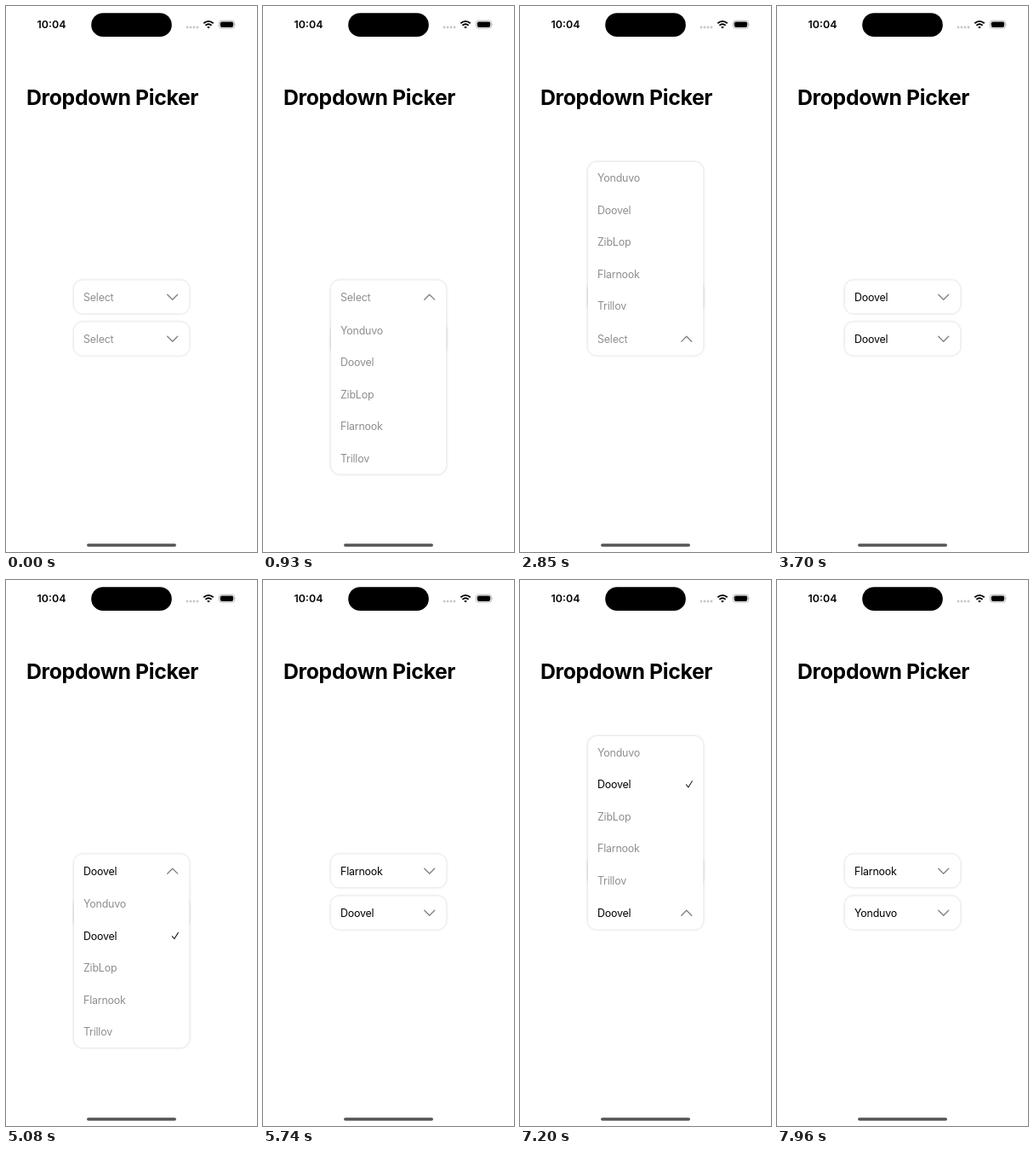
An HTML page that plays this animation: 295 by 640 pixels, repeating every 8000 ms.

```html
<!DOCTYPE html>
<html lang="en">
<head>
<meta charset="utf-8">
<title>Dropdown Picker</title>
<style>
  html, body { margin: 0; width: 100%; height: 100%; overflow: hidden; background: #fff; }
  svg { display: block; width: 295px; height: 640px; }
  text { font: 400 12.4px Inter, "Liberation Sans", sans-serif; letter-spacing: -.18px; }
  .clock { font-weight: 600; letter-spacing: 0; }
  .title { font-size: 24.8px; font-weight: 700; letter-spacing: -.34px; }
  .line { fill: none; stroke-linecap: round; stroke-linejoin: round; }
  .card { fill: #fff; filter: drop-shadow(0 0 1.7px rgba(0, 0, 0, .22)); }
</style>
</head>
<body>
<svg viewBox="0 0 295 640">
  <text class="clock" x="36.6" y="26.1">10:04</text>
  <rect x="100.2" y="8.3" width="94.6" height="27.8" rx="13.9"/>
  <g fill="#c6c6c8">
    <circle cx="213" cy="25" r="1.4"/><circle cx="217" cy="25" r="1.4"/>
    <circle cx="221" cy="25" r="1.4"/><circle cx="225" cy="25" r="1.4"/>
  </g>
  <path d="M232.3 20.3Q238 15.5 243.7 20.3M234.4 22.7Q238 19.9 241.6 22.7" fill="none" stroke="#000" stroke-width="1.8"/>
  <path d="M236.1 24.6Q238 23.2 239.9 24.6L238 26.5Z"/>
  <rect x="250.4" y="17.2" width="18.2" height="9" rx="3" fill="none" stroke="#a8a8a8" stroke-width=".8"/>
  <rect x="251.8" y="18.5" width="15.4" height="6.4" rx="1.8"/>
  <path d="M269.6 20.2q1.3 1.5 0 3z" fill="#a8a8a8"/>
  <text class="title" x="24" y="116.2">Dropdown Picker</text>
  <g id="boxes"></g>
  <rect x="95" y="630.2" width="105" height="3.6" rx="1.8" fill="#555"/>
</svg>
<script>
const LOOP = 8000, STEP = 106, LEAD = 96;
const HEAD = 38.8, ROW = 37.5, LEFT = 79.8, WIDTH = 135.6, GRAY = '#8e8e91';
const names = ['Yonduvo', 'Doovel', 'ZibLop', 'Flarnook', 'Trillov'];
const listHeight = ROW * names.length;

// time, box, chosen row (none when the tap opens the list)
const taps = [
  [500, 0], [1360, 0, 1], [2300, 1], [3380, 1, 1],
  [4530, 0], [5420, 0, 3], [6420, 1], [7430, 1, 0]
];

const root = document.getElementById('boxes');
const label = (cls, y, str = '') => `<text class="${cls}" x="91" y="${y + 4.9}" fill="${GRAY}">${str}</text>`;

function makeBox(y, up, id) {
  const g = document.createElementNS('http://www.w3.org/2000/svg', 'g');
  const mid = y + HEAD / 2;
  const frame = cls => `<rect class="${cls}" x="${LEFT}" width="${WIDTH}" rx="11"/>`;
  const rows = names.map((name, i) => {
    const c = ROW * (i + .5);
    return `<g class="row">${label('', c, name)}<path class="line" stroke="#222" stroke-width="1.1"
      d="M195.4 ${c + .6}l2.4 3l4.6 -7.2"/></g>`;
  }).join('');
  g.innerHTML = `<clipPath id="clip${id}">${frame('edge')}</clipPath>${frame('card edge')}
    <g clip-path="url(#clip${id})">
      <g class="list">${rows}</g>
      <rect x="${LEFT}" y="${y}" width="${WIDTH}" height="${HEAD}" fill="#fff"/>
      ${label('head', mid)}${label('head', mid)}
      <path class="line chevron" stroke="#808080" stroke-width="1.3" d="M-6 -3L0 3L6 -3"/>
    </g>`;
  root.append(g);
  const all = s => [...g.querySelectorAll(s)];
  return { g, y, up, mid, edges: all('.edge'), list: all('.list')[0], rows: all('.row'),
    heads: all('.head'), chevron: all('.chevron')[0] };
}

const boxes = [makeBox(321.5, false, 0), makeBox(370.6, true, 1)];

// Lightly bouncing spring: 0.5 s period, damping 0.85
function spring(s) {
  const w = 4 * Math.PI, z = .85, d = w * Math.sqrt(1 - z * z);
  return 1 - Math.exp(-z * w * s) * (Math.cos(d * s) + z * w / d * Math.sin(d * s));
}

function setHead(el, row, opacity) {
  el.textContent = row < 0 ? 'Select' : names[row];
  el.setAttribute('fill', row < 0 ? GRAY : '#000');
  el.setAttribute('opacity', opacity);
}

function drawBox(box, index, t) {
  let open = 0, row = -1, old = -1, fade = 1;
  for (const [at, target, pick] of taps) {
    if (target !== index || at > t) continue;
    const s = spring((Math.floor((t - at) / STEP) * STEP + LEAD) / 1000);
    if (pick === undefined) {
      open = s;
      fade = 1;
    } else {
      open = Math.max(0, 1 - s);
      fade = Math.min(1, s);
      old = row;
      row = pick;
    }
  }
  const grow = listHeight * open;
  const top = box.up ? box.y - grow : box.y;
  for (const e of box.edges) {
    e.setAttribute('y', top);
    e.setAttribute('height', HEAD + grow);
  }
  const listTop = box.up ? top : box.y + HEAD + grow - listHeight;
  box.list.setAttribute('transform', `translate(0 ${listTop})`);
  box.rows.forEach((r, i) => {
    r.firstChild.setAttribute('fill', i === row ? '#000' : GRAY);
    r.lastChild.setAttribute('opacity', i === row ? 1 : 0);
  });
  setHead(box.heads[0], old, 1 - fade);
  setHead(box.heads[1], row, fade);
  box.chevron.setAttribute('transform', `translate(195.7 ${box.mid + .3}) rotate(${-180 * open})`);
}

function draw(now) {
  const t = now % LOOP;
  let front = 1;
  for (const [at, target] of taps) if (at <= t) front = target;
  if (root.lastChild !== boxes[front].g) root.append(boxes[front].g);
  boxes.forEach((box, i) => drawBox(box, i, t));
}

const start = performance.now();
function tick() {
  draw(performance.now() - start);
  requestAnimationFrame(tick);
}
tick();
</script>
</body>
</html>
```
